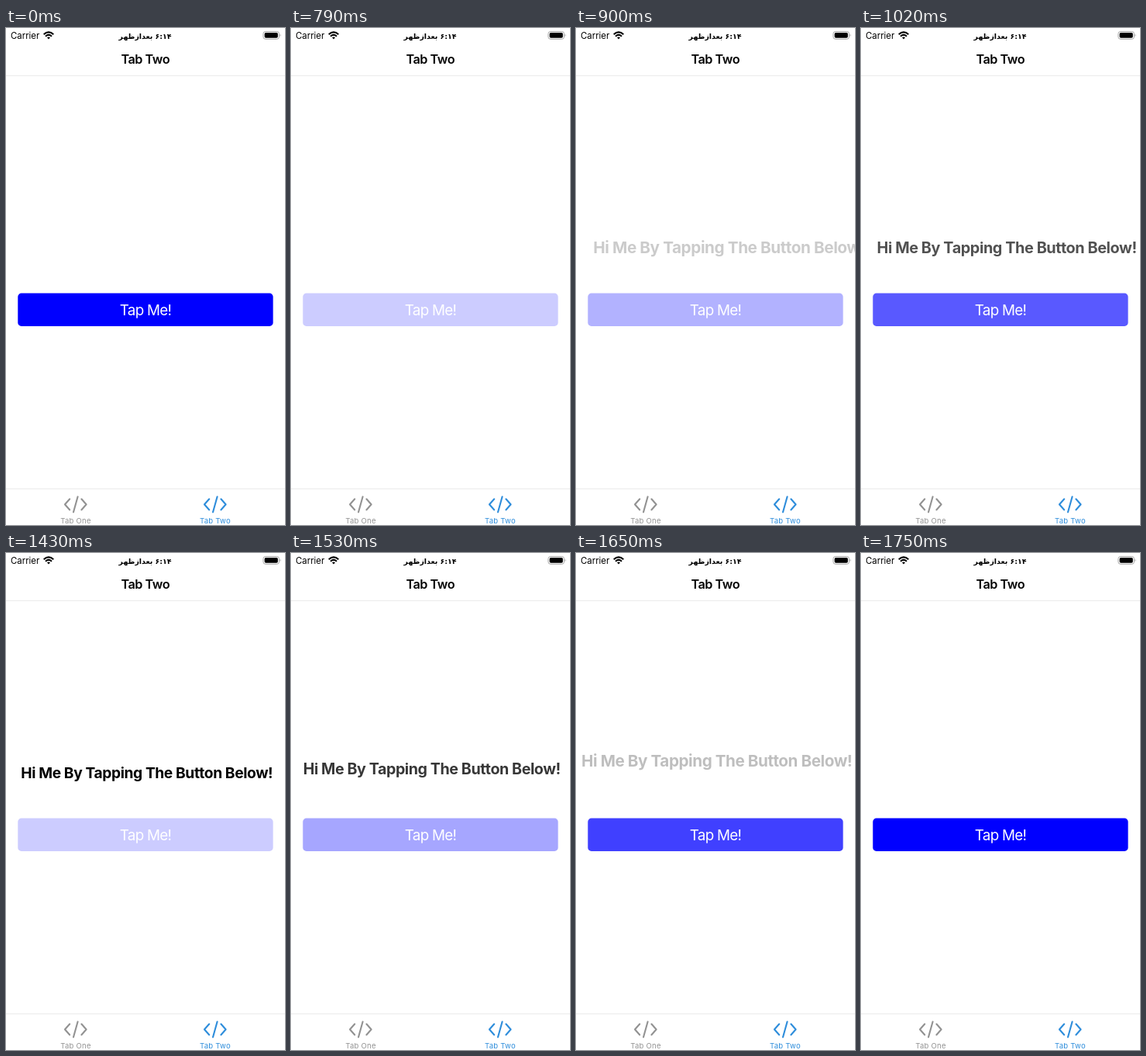
Animation, 360 px wide and 640 px high, one loop 1770 ms. Source, as an HTML page:

```html
<!DOCTYPE html>
<html lang="en">
<head>
<meta charset="utf-8">
<title>Tab Two</title>
<style>
  html, body { margin: 0; width: 100%; height: 100%; overflow: hidden; background: #fff; }
  svg { display: block; width: 360px; height: 640px; font-family: Inter, sans-serif; }
  .middle { text-anchor: middle; }
  .carrier { font-size: 11.4px; }
  .clock { font: bold 9.4px "DejaVu Sans", sans-serif; direction: rtl; }
  .title { font-size: 16.2px; font-weight: 600; letter-spacing: -.45px; }
  .message { font-size: 19.2px; font-weight: 700; letter-spacing: -.39px; }
  .action { font-size: 18.8px; letter-spacing: -.7px; fill: #fff; }
  .label { font-size: 9.5px; letter-spacing: .25px; stroke: none; fill: currentColor; }
  .tab { fill: none; stroke: currentColor; stroke-width: 2.1; stroke-linecap: round; stroke-linejoin: round; }
</style>
</head>
<body>
<svg viewBox="0 0 360 640">
  <text class="carrier" x="6" y="14">Carrier</text>
  <g fill="none" stroke="#000" stroke-width="2.1">
    <path d="M48.7 8.2Q55 2.6 61.3 8.2M51 10.7Q55 7.1 59 10.7"/>
    <path d="M53 12.3Q55 10.7 57 12.3L55 14.4Z" fill="#000" stroke="none"/>
  </g>
  <text class="clock middle" x="179.5" y="13.5">۶:۱۴ بعدازظهر</text>
  <rect x="331.9" y="4.5" width="20.6" height="9.8" rx="3" fill="none" stroke="#a6a6a6"/>
  <rect x="333.6" y="6.1" width="17.2" height="6.6" rx="1.7"/>
  <path d="M353.6 7.7Q355.6 9.4 353.6 11.1Z" fill="#a6a6a6"/>

  <text class="title middle" x="179.8" y="46.3">Tab Two</text>
  <path d="M0 61.5H360M0 593.5H360" stroke="#ebebeb"/>

  <g id="message">
    <text class="message middle" x="0" y="6.9">Hi Me By Tapping The Button Below!</text>
  </g>
  <rect id="button" x="15.3" y="341.6" width="329.3" height="42.3" rx="4.5" fill="#00f"/>
  <text class="action middle" x="180" y="370.2">Tap Me!</text>

  <defs>
    <path id="code" d="M-7.6 -7L-13.8 0L-7.6 7M7.6 -7L13.8 0L7.6 7M2.8 -10L-2.8 10"/>
  </defs>
  <g class="tab" color="#929292">
    <use href="#code" x="89.8" y="613.5"/>
    <text class="label middle" x="90" y="637.5">Tab One</text>
  </g>
  <g class="tab" color="#2e8ddb">
    <use href="#code" x="269.8" y="613.5"/>
    <text class="label middle" x="270" y="637.5">Tab Two</text>
  </g>
</svg>
<script>
  const LOOP = 1770;
  const message = document.getElementById("message");
  const button = document.getElementById("button");

  // The screen refreshes in steps: start time, message and button opacity.
  const steps = [
    [0, 0, 1], [790, 0, .2], [900, .2, .3], [1020, .68, .65], [1120, 1, 1],
    [1430, 1, .2], [1530, .78, .35], [1650, .25, .75], [1750, 0, 1]
  ];

  // The message slides in from the right and leaves upwards, enlarged while faded.
  function draw(time) {
    const [start, shown, pressed] = steps.findLast(step => step[0] <= time);
    const hidden = 1 - shown;
    const leaving = start >= 1430;
    const x = 181.7 + (leaving ? 0 : 20 * hidden);
    const y = 282.7 - (leaving ? 19.5 * hidden : 0);
    message.setAttribute("transform", `translate(${x} ${y}) scale(${1 + .1 * hidden})`);
    message.setAttribute("opacity", shown);
    button.setAttribute("opacity", pressed);
  }

  const origin = performance.now();
  function tick() {
    draw((performance.now() - origin) % LOOP);
    requestAnimationFrame(tick);
  }
  tick();
</script>
</body>
</html>
```
